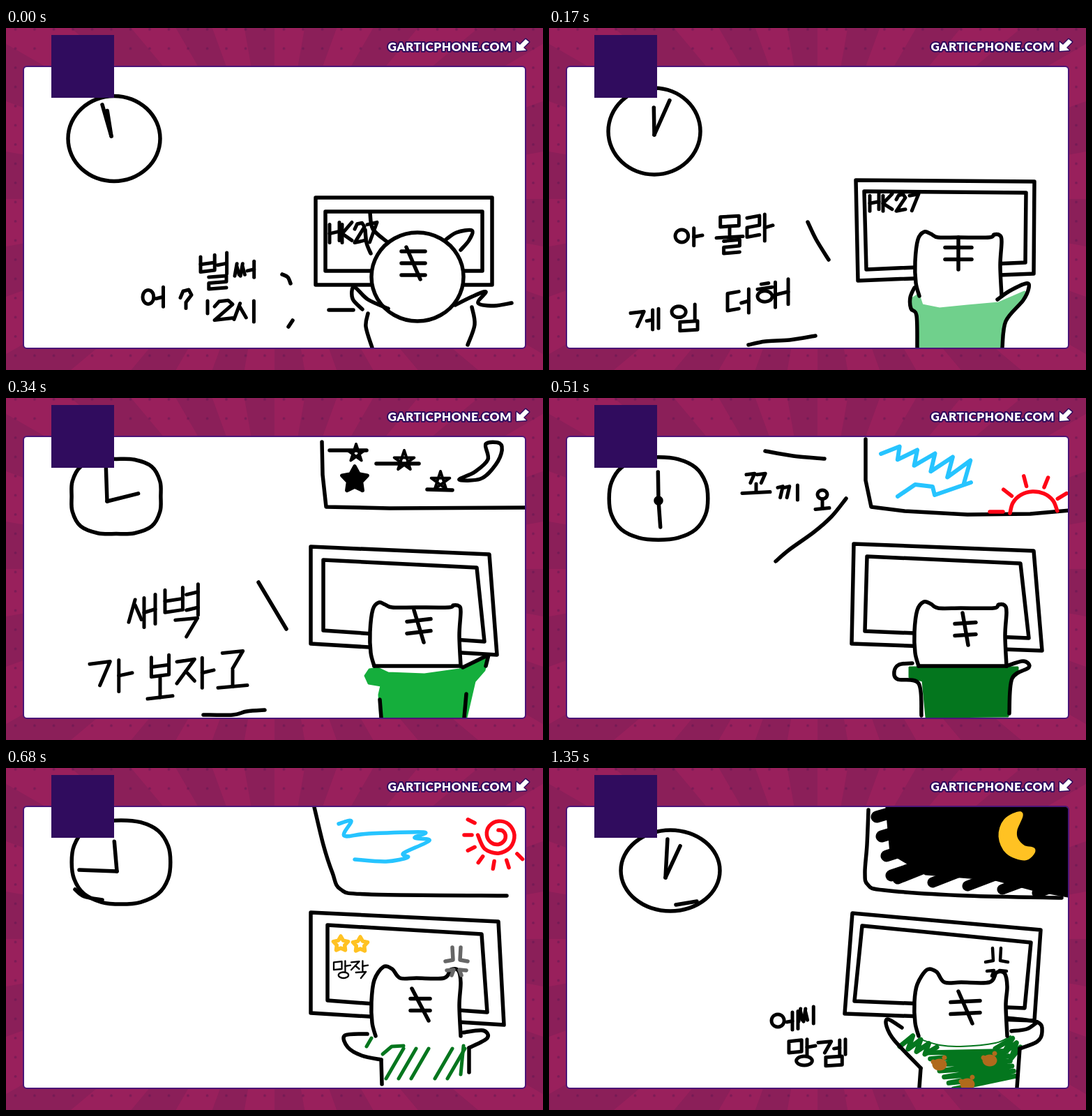
These frames come from a looping animation (770 px wide and 490 px high, 1680 ms). An HTML page:

```html
<!DOCTYPE html>
<html lang="ko">
<head>
<meta charset="utf-8">
<title>Night gaming</title>
<style>
html, body { margin: 0; width: 100%; height: 100%; overflow: hidden; background: #99205c; }
svg { display: block; width: 770px; height: 490px; }
.url { font: 900 17.2px Lato, "Open Sans", sans-serif; letter-spacing: .55px; fill: #fff; stroke: #300c5e; stroke-width: 4px; stroke-linejoin: round; paint-order: stroke; }
</style>
</head>
<body>
<svg viewBox="0 0 770 490">
  <defs>
    <clipPath id="page"><rect x="26" y="56" width="718" height="402" rx="4"/></clipPath>
    <pattern id="dots" width="27.5" height="27.5" patternUnits="userSpaceOnUse">
      <circle cx="13.5" cy="1.9" r="1.9" fill="#5d1550" opacity=".5"/>
    </pattern>
  </defs>
  <rect width="770" height="490" fill="#99205c"/>
  <path id="rays" fill="#8b1f59"/>
  <rect width="770" height="490" fill="url(#dots)"/>
  <rect x="25" y="55" width="720" height="404" rx="5" fill="#fff" stroke="#4b1577" stroke-width="2"/>
  <g id="scenes" clip-path="url(#page)" fill="none" stroke-linecap="round" stroke-linejoin="round"></g>
  <rect x="65" y="10" width="90" height="90" fill="#300c5e"/>
  <text class="url" x="725" y="32.5" text-anchor="end">GARTICPHONE.COM</text>
  <path d="M732 20l5 4 8-8 5 4-8 8 4 4-14 1z" fill="#fff" stroke="#300c5e" stroke-width="3" stroke-linejoin="round" paint-order="stroke"/>
</svg>
<script>
const BLACK = "#000", BLUE = "#26c4ff", RED = "#ff0516", GOLD = "#ffc223", GREEN = "#04761e", BROWN = "#b06a1c";
const STEP = 170, LOOP = 1680;
const range = n => Array.from({ length: n }, (_, i) => i);
const polar = (x, y, deg, rx, ry = rx) => [x + rx * Math.cos(deg * Math.PI / 180), y + ry * Math.sin(deg * Math.PI / 180)];
const mix = (a, b, t) => [a[0] + (b[0] - a[0]) * t, a[1] + (b[1] - a[1]) * t];
const points = p => typeof p === "string" ? p.split(" ").map(q => q.split(",").map(Number)) : p;
const at = p => p.map(v => v.toFixed(1)).join(" ");

const path = (d, { color = BLACK, width = 5.5, fill = "none" } = {}) =>
  `<path d="${d}" stroke="${color}" stroke-width="${width}" fill="${fill}"/>`;
const line = (p, o = {}) => path("M" + points(p).map(at).join("L") + (o.shut ? "z" : ""), o);
const lines = (s, o) => s.split("|").map(p => line(p, o)).join("");
const solid = (p, color) => line(p, { color, width: 3, fill: color, shut: true });

// Smooth stroke through the given points
function curve(p, o = {}) {
  const q = points(p), n = q.length;
  const get = i => o.shut ? q[(i + n) % n] : q[Math.max(0, Math.min(n - 1, i))];
  const lean = (i, s) => [0, 1].map(k => get(i)[k] + s * (get(i + 1)[k] - get(i - 1)[k]) / 6);
  const part = i => "C" + [lean(i, 1), lean(i + 1, -1), get(i + 1)].map(at).join(" ");
  return path("M" + at(q[0]) + range(o.shut ? n : n - 1).map(part).join(""), o);
}
const curves = (s, o) => s.split("|").map(p => curve(p, o)).join("");
const oval = (x, y, rx, ry = rx, o) => curve(range(12).map(i => polar(x, y, i * 30, rx, ry)), { ...o, shut: true });

// Handwriting: each letter is strokes on a 5 by 5 grid, "o" is a ring
const LETTERS = {
  ㄱ: "00 40 24", ㄷ: "40 00 04 44", ㄹ: "00 40 42 02 04 44", ㅁ: "00 04 44 40 00", ㅂ: "00 04 44 40|02 42",
  ㅅ: "20 04|21 44", ㅇ: "o", ㅈ: "00 40 04|22 44", ㅎ: "10 30|01 41|o", ㅏ: "10 14|12 42", ㅓ: "30 34|02 32",
  ㅣ: "20 24", ㅔ: "20 24|02 22|40 44", ㅐ: "00 04|02 42|40 44", ㅕ: "30 34|01 31|03 33", ㅗ: "20 23|03 43",
  H: "00 04|40 44|02 42", K: "00 04|40 02 44", 1: "20 24", 2: "01 10 30 41 04 44", 7: "00 40 14", "?": "01 10 30 41 22 23|24"
};
const LEADS = "ㄱㄲㄴㄷㄸㄹㅁㅂㅃㅅㅆㅇㅈㅉㅊㅋㅌㅍㅎ", TWINS = { ㄲ: "ㄱ", ㅆ: "ㅅ" };
const VOWELS = "ㅏㅐㅑㅒㅓㅔㅕㅖㅗㅘㅙㅚㅛㅜㅝㅞㅟㅠㅡㅢㅣ", TAILS = "ㄱㄲㄳㄴㄵㄶㄷㄹㄺㄻㄼㄽㄾㄿㅀㅁㅂㅄㅅㅆㅇ";

function letter(c, x, y, w, h, o) {
  if (TWINS[c]) return letter(TWINS[c], x, y, w * .42, h, o) + letter(TWINS[c], x + w * .55, y, w * .42, h, o);
  const top = c === "ㅎ" ? .4 : 0;
  return LETTERS[c].split("|").map(s => s === "o"
    ? oval(x + w / 2, y + h * (1 + top) / 2, w / 2, h * (1 - top) / 2, o)
    : line(s.split(" ").map(([u, v]) => [x + w * u / 4, y + h * (v / 4 - .06 * (u - 2) / 2)]), o)).join("");
}

function glyph(c, x, y, w, h, o) {
  const put = (j, u, v, a, b) => letter(j, x + u * w, y + v * h, a * w, b * h, o);
  if (LETTERS[c]) return put(c, 0, 0, 1, 1);
  const [l, v, t] = [...c.normalize("NFD")].map(j => j.charCodeAt(0));
  const lead = LEADS[l - 0x1100], vowel = VOWELS[v - 0x1161], low = vowel === "ㅗ", k = t ? .6 : 1;
  return (low ? put(lead, .15, 0, .7, .45 * k) + put(vowel, 0, .5 * k, 1, .6 * k)
    : put(lead, 0, .12 * k, .48, .72 * k) + put(vowel, .58, 0, .42, k)) + (t ? put(TAILS[t - 0x11a8], .28, .66, .6, .34) : "");
}
const write = (text, x, y, w, h, step = 0, o = { width: 5 }) => [...text].map((c, i) => glyph(c, x + i * step, y, w, h, o)).join("");

// Props
function clock(x, y, rx, ry, square, hx, hy, ...hands) {
  const rim = range(16).map(i => polar(x, y, i * 22.5, 1).map((v, k) => {
    const r = 1 - square * Math.cos(i * Math.PI / 2);
    return k ? y + (v - y) * ry * r : x + (v - x) * rx * r;
  }));
  return curve(rim, { shut: true }) + hands.map(([deg, len]) => line([[hx, hy], polar(hx, hy, deg - 90, len)])).join("");
}

function monitor(corners, dx, dy) {
  const c = points(corners);
  const inner = c.map(([x, y], i) => [x + (i % 3 ? -dx : dx), y + (i < 2 ? dy : -dy)]);
  return line(c, { shut: true }) + line(inner, { shut: true });
}

function head(x, w, top, ear, shut) {
  const a = 16 + ear, b = a * .75, r = x + w, tip = top - ear;
  return curve([[x + 5, 384], [x, 365], [x - 1, 335], [x + 3, top + 3], [x + a * .5, tip], [x + a * .9, tip + 3], [x + a + 8, top],
    [x + w / 2, top], [r - b, top], [r - b * .6, tip + 4], [r - b * .15, tip + 5], [r, top + 6], [r - 2, 340], [r, 384]], { fill: "#fff" })
    + (shut ? line([[x + 5, 384], [r, 384]]) : "");
}

const stripes = (x, y, lean, half, tilt = 0, n = 2) => line([[x - lean, y - 23], [x + lean, y + 23]])
  + range(n).map(i => (i - (n - 1) / 2) * 17).map(d => line([[x - half, y + d + tilt], [x + half, y + d - tilt]])).join("");

// Back and forth between the segments a-b and c-d
const zigzag = (a, b, c, d, n, o) => line(range(n).map(i => i % 2 ? mix(c, d, i / (n - 1)) : mix(a, b, i / (n - 1))), o);
const star = (x, y, r, inner, o) => line(range(10).map(i => polar(x, y, i * 36 - 90, i % 2 ? inner : r)), { ...o, shut: true });
const pentagram = (x, y, r) => line(range(5).map(i => polar(x, y, i * 144 - 90, r)), { width: 4, shut: true });
const beams = (x, y, from, step, n, r1, r2) =>
  range(n).map(i => line([polar(x, y, from + i * step, r1), polar(x, y, from + i * step, r2)], { color: RED })).join("");
const bear = (x, y) => [[0, 0, 9, 7], [-9, -4, 2, 2], [7, -10, 2, 2]]
  .map(([u, v, a, b]) => oval(x + u, y + v, a, b, { color: BROWN, fill: BROWN, width: 3 })).join("");
const anger = (x, y, o) => [1, -1].map(s =>
  lines(`${x - s * 6},${y - 18} ${x - s * 5},${y} ${x - s * 16},${y + 2}|${x - s * 14},${y + 15} ${x - s * 4},${y + 14} ${x - s * 7},${y + 22}`, o)).join("");

const slashes = range(5).map(i => 570 + i * 18 + (i > 2 ? 16 : 0))
  .map(x => line([[x, 402], [x - 25, 445]], { color: GREEN, width: 5 })).join("");
const spiral = range(15).map(i => polar(706, 96, i * 45 - 90, 7 + i * 1.6));
const night = range(4).map(i => line([[470 + 7 * i, 70 + 28 * i], [640, 20 + 28 * i]], { width: 17 })).join("")
  + range(5).map(i => line([[500 + 50 * i, 159 + 5 * i], [600 + 50 * i, 119 + 6 * i]], { width: 15 })).join("");
const leaf = { color: GREEN, width: 7 };

const scenes = [
  // midnight
  clock(155, 158.5, 66, 61, 0, 151, 155, [-16, 47], [-9, 37]) +
  monitor("444,243 697,243 697,368 444,368", 14, 20) +
  write("HK27", 464, 280, 14, 26, 18) +
  curves("523,323 517,308 515,289|522,265 526,288 546,306|631,303 646,293 668,290 664,304 652,318") +
  oval(590, 356.5, 66, 63.5, { fill: "#fff" }) + stripes(584, 337, 10, 17, 0, 3) +
  curves("511,403 497,388 499,371 519,389 548,402|644,397 668,385 688,378 677,394 700,398 725,394|519,409 516,428 525,458|668,400 672,425 662,454|463,404 498,404|396,353 404,357 408,366|411,419 405,428") +
  write("벌", 279, 323, 42, 50) + write("써", 328, 335, 31, 23) +
  write("어", 196, 372, 33, 28) + write("?", 250, 376, 16, 34) + write("1", 283, 391, 12, 18) + write("2", 299, 391, 26, 26) + write("시", 327, 391, 36, 30),

  // one o'clock
  clock(151, 148, 66, 62, 0, 151, 153, [-1, 39], [24, 54]) +
  monitor("440,218 696,220 695,352 443,362", 12, 16) + write("HK27", 460, 239, 13, 22, 19) +
  solid("520,388 530,382 535,397 560,402 600,398 645,394 682,378 678,392 655,418 650,458 530,458 528,412 521,402", "#70d08c") +
  head(526, 123, 300, 8) + stripes(587, 323, 0, 19) +
  curves("524,372 518,386 519,402 527,412 528,458|643,389 660,377 684,366 688,372 680,390 655,420 650,458") +
  write("아", 181, 286, 39, 25) + write("몰", 240, 270, 38, 52) + write("라", 284, 266, 37, 38) +
  write("게", 117, 404, 40, 28) + write("임", 176, 396, 42, 37) + write("더", 256, 375, 34, 34) + write("해", 299, 362, 44, 36) +
  curves("371,278 383,303 401,332|286,454 310,449 345,447 382,441"),

  // three o'clock
  clock(158, 141, 68, 57, .06, 145, 148, [-2, 52], [76, 46]) +
  lines("453,63 454,110 459,156 550,158 750,157|464,75 517,75|531,94 592,94|604,131 640,132") +
  pentagram(502, 79, 13) + pentagram(571, 90, 15) + pentagram(623, 119, 14) + star(500, 117, 19, 10, { fill: BLACK }) +
  curve("688,66 708,65 710,80 698,101 680,116 650,117 672,106 691,88", { shut: true }) +
  monitor("437,213 693,224 704,368 437,352", 18, 19) +
  solid("515,398 521,389 533,387 548,394 600,396 650,389 690,373 686,390 672,406 660,458 537,458 535,425 538,412 520,409", "#15ae3c") +
  head(523, 129, 300, 7, true) + stripes(592, 327, 7, 17, 2) +
  lines("655,386 692,368 688,384|660,424 657,458|536,432 538,458") +
  write("새", 176, 284, 38, 42) + write("벽", 228, 268, 53, 74) +
  write("가", 120, 374, 61, 45) + write("보", 203, 370, 36, 62) + write("자", 245, 371, 53, 43) + write("고", 304, 364, 42, 52) +
  curves("362,264 402,331|283,454 325,454 345,449 371,447"),

  // six in the morning
  clock(157, 144, 73, 61, .03, 157, 147, [-1, 41], [176, 38]) + oval(157, 147, 4, 4, { fill: BLACK }) +
  curves("310,76 350,83 395,87|426,144 405,170 380,192 345,217 325,234") +
  write("꼬", 277, 109, 40, 28) + write("끼", 328, 125, 36, 21) + write("오", 382, 132, 20, 28) +
  lines("454,59 454,118 462,156 510,162 600,167 690,166 748,161") +
  zigzag([476, 80], [595, 122], [490, 67], [617, 92], 11, { color: BLUE, width: 6 }) +
  line("500,141 525,124 550,127 553,139 605,121", { color: BLUE, width: 6 }) +
  curve(range(7).map(i => polar(695, 165, 180 + i * 29, 34, 31)), { color: RED }) + beams(695, 165, -142, 37, 4, 40, 55) +
  line("632,163 651,163", { color: RED }) +
  monitor("437,209 695,219 707,362 434,352", 19, 18) +
  solid("517,386 672,386 672,395 662,404 658,456 541,457 536,405 517,400", GREEN) +
  head(525, 131, 301, 9, true) + stripes(597, 331, 4, 15, 1) +
  curves("521,380 502,382 495,392 500,403 530,409 534,455|656,384 680,377 688,386 664,402 660,452"),

  // nine in the morning
  clock(165, 135, 73, 62, .03, 159, 148, [-5, 43], [-88, 54]) +
  curves("99,174 112,184 138,189|442,56 455,110 468,150 480,174 520,181 718,183") +
  curve("477,80 495,76 485,97 520,94 599,92 586,100 607,104 570,122 576,128 545,134 500,131", { color: BLUE }) +
  curve(spiral, { color: RED }) + beams(706, 96, 45, 27, 7, 38, 49) +
  monitor("437,207 706,220 714,368 437,351", 24, 18) +
  star(480, 252, 11, 6, { color: GOLD }) + star(508, 253, 11, 6, { color: GOLD }) +
  write("망작", 470, 276, 24, 25, 25, { width: 2.3 }) +
  head(525, 127, 301, 16) + stripes(594, 339, 12, 14) +
  curves("518,381 486,383 490,400 510,412 538,418|538,418 539,453|656,379 684,376 690,387 664,401|664,401 664,436") +
  anger(646, 275, { color: "#666" }) +
  slashes + lines("517,399 524,387|540,410 553,399 570,398|656,398 652,439", { color: GREEN, width: 5 }),

  // the next night
  clock(174, 147, 71, 58, 0, 167, 157, [3, 55], [25, 50]) +
  line("182,196 212,191") + curve("458,60 456,110 453,150 457,167 480,175 600,183 735,186") +
  solid("484,56 744,56 744,184 700,176 640,160 540,152 490,122", BLACK) + night +
  curve("676,66 655,76 648,98 658,120 682,129 694,118 680,114 669,102 668,88", { color: GOLD, width: 7, fill: GOLD, shut: true }) +
  monitor("435,208 705,232 696,362 424,352", 14, 18) +
  anger(642, 276, { width: 4.5 }) +
  zigzag([503, 399], [545, 412], [516, 381], [556, 400], 8, leaf) + zigzag([640, 402], [668, 420], [662, 384], [676, 400], 6, leaf) +
  zigzag([540, 408], [580, 460], [655, 402], [670, 445], 13, leaf) +
  curve("530,388 560,397 590,399 640,394 662,384", { color: GREEN, width: 2 }) +
  bear(560, 425) + bear(632, 419) + bear(600, 453) +
  head(525, 132, 307, 18) + stripes(597, 343, 10, 21, 1) +
  curves("506,372 486,360 484,370 495,390 533,430|533,430 531,458|656,358 700,364 707,378 700,392 675,402|663,377 685,374 700,364|675,402 671,458") +
  write("에", 319, 350, 38, 25) + write("씨", 358, 342, 27, 24) + write("망", 344, 388, 38, 38) + write("겜", 386, 390, 39, 36)
];

const spoke = i => at(polar(385, 245, i * 10, 600));
document.getElementById("rays").setAttribute("d", range(18).map(i => `M385 245L${spoke(2 * i)}L${spoke(2 * i + 1)}z`).join(""));

const root = document.getElementById("scenes");
root.innerHTML = scenes.map(s => `<g>${s}</g>`).join("");
const groups = [...root.children];

function draw() {
  const now = Math.min(scenes.length - 1, Math.floor(performance.now() % LOOP / STEP));
  groups.forEach((g, i) => g.setAttribute("display", i === now ? "inline" : "none"));
  requestAnimationFrame(draw);
}
draw();
</script>
</body>
</html>
```
